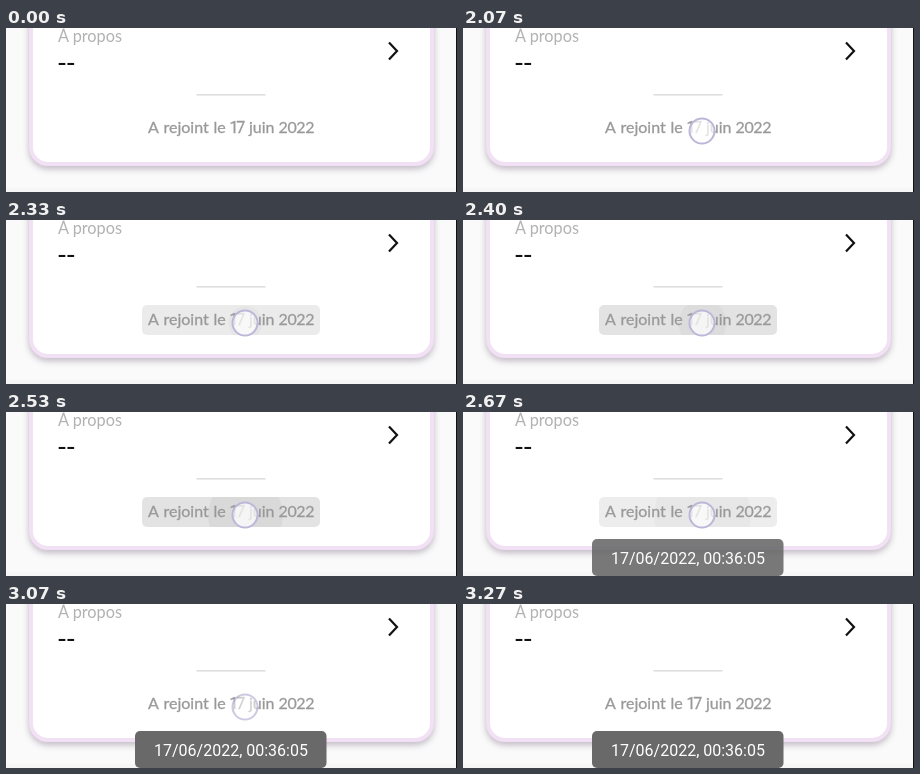
Recreate the animation shown at these times as an HTML page. Size 451x164 px, loop 4390 ms.

```html
<!DOCTYPE html>
<html lang="fr">
<head>
<meta charset="utf-8">
<title>Profil</title>
<style>
  html, body { margin: 0; width: 100%; height: 100%; overflow: hidden; background: #fafafa; }
  #stage { position: relative; width: 451px; height: 164px; overflow: hidden; }
  .card {
    position: absolute; left: 22.5px; top: -40px; width: 405.5px; height: 178px;
    box-sizing: border-box; border: 4px solid #f2e1f5; border-radius: 19px;
    background: #fff; box-shadow: 0 3px 6px rgba(75, 50, 85, .32);
  }
  svg { position: absolute; left: 0; top: 0; display: block; }
  text { font: 16px Lato, sans-serif; }
  .label { fill: #b2b2b2; font-size: 16.3px; }
  .joined { fill: #999; stroke: #999; stroke-width: .3; }
  .day { font-family: Roboto, sans-serif; letter-spacing: -2.4px; }
  .value { fill: #111; font-size: 27px; letter-spacing: -1.2px; }
  #toast text { font-family: Roboto, sans-serif; fill: #fff; }
</style>
</head>
<body>
<div id="stage">
  <div class="card"></div>
  <svg width="451" height="164" viewBox="0 0 451 164">
    <clipPath id="pill"><rect x="136" y="85" width="178" height="30" rx="5"/></clipPath>
    <rect y="160" width="451" height="4" fill="#f6f6f6"/>
    <rect x="450" width="1" height="164" fill="#111"/>

    <text class="label" x="52" y="14.2">À propos</text>
    <text class="value" x="51" y="44.4">--</text>
    <path d="M383 14.5l8 8.5-8 8.5" fill="none" stroke="#111" stroke-width="2.2"/>
    <rect x="190.5" y="66" width="69" height="1.6" fill="#dedede"/>

    <g clip-path="url(#pill)">
      <rect id="press" x="136" y="85" width="178" height="30" opacity="0"/>
      <circle id="splash" cx="239.5" cy="103" opacity="0"/>
    </g>
    <text class="joined" y="105"><tspan x="142">A</tspan> <tspan x="157.5">rejoint</tspan> <tspan x="207.5">le</tspan> <tspan class="day" x="223.6">17</tspan> <tspan x="243">juin</tspan> <tspan x="272.5" letter-spacing="-.4">2022</tspan></text>

    <circle id="touch" cx="239" cy="103" r="12.5" fill="#fff" fill-opacity=".72" stroke="#bcb7d9" stroke-width="2" opacity="0"/>
    <g id="toast" opacity="0">
      <rect x="129" y="127" width="191.5" height="37" rx="5" fill="#696969"/>
      <text x="148" y="152">17/06/2022, 00:36:05</text>
    </g>
  </svg>
</div>
<script>
const LOOP = 4390, FPS = 15;
const DOWN = 2060, RELEASE = 2600, LIFT = 3000;
const $ = id => document.getElementById(id);
const press = $('press'), splash = $('splash'), touch = $('touch'), toast = $('toast');

// Linear progress from 0 to 1 between two times.
const ramp = (t, from, to) => Math.min(1, Math.max(0, (t - from) / (to - from)));
const set = (el, name, value) => el.setAttribute(name, value.toFixed(3));

function draw(time) {
  const t = Math.floor((time % LOOP + 5) * FPS / 1000) * 1000 / FPS;
  const fade = 1 - ramp(t, RELEASE, RELEASE + 180);

  set(press, 'opacity', .11 * ramp(t, 2190, 2390) * fade);
  set(splash, 'opacity', .045 * ramp(t, 2200, 2470) * fade);
  set(splash, 'r', 37.5 * ramp(t, 2170, 2530) + 21 * ramp(t, RELEASE, RELEASE + 130));
  set(touch, 'opacity', t < DOWN ? 0 : 1 - ramp(t, LIFT, LIFT + 265));
  set(toast, 'opacity', ramp(t, RELEASE, RELEASE + 75));
}

function tick() {
  draw(performance.now());
  requestAnimationFrame(tick);
}
tick();
</script>
</body>
</html>
```
